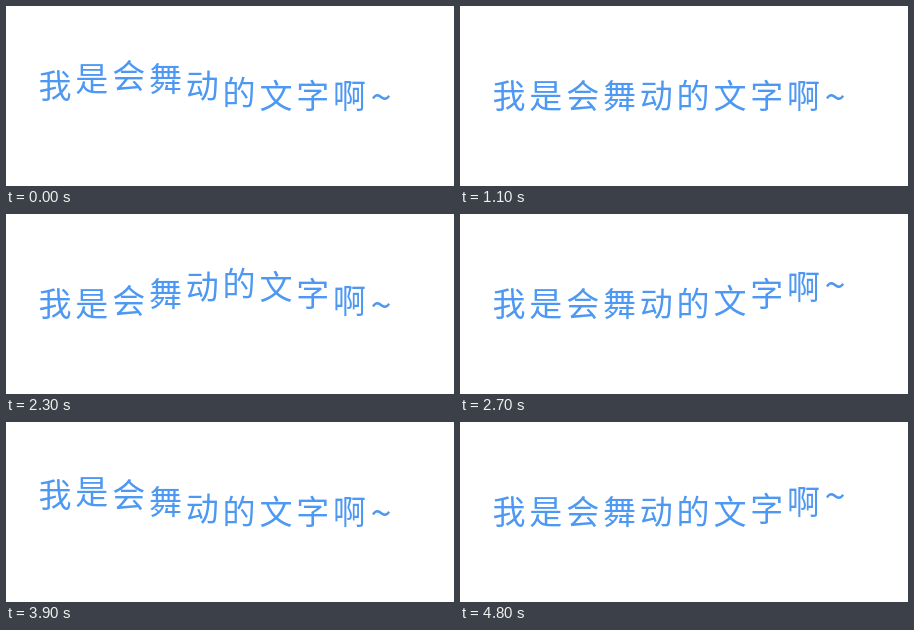
An HTML page for the animation above (4900 ms loop, 448 by 180 pixels).

```html
<!DOCTYPE html>
<html lang="zh-CN">
<head>
<meta charset="utf-8">
<title>舞动的文字</title>
<style>
  html, body {
    margin: 0;
    width: 100%;
    height: 100%;
    overflow: hidden;
    background: #fff;
  }
  .line {
    --t: 0;
    position: absolute;
    left: 32.5px;
    top: 62px;
    display: flex;
    align-items: flex-start;
    font: 400 33px/52px "Noto Sans CJK SC", "Noto Sans CJK", sans-serif;
    letter-spacing: 3.8px;
    white-space: nowrap;
    color: #4d98f2;
  }
  /* Each letter starts 100 ms after its neighbour; the clock sets --t. */
  .line span {
    animation: jump 2s ease-in-out infinite paused both;
    animation-delay: calc(var(--i) * 100ms - 600ms - var(--t) * 1ms);
  }
  .line span:last-child {
    position: relative;
    left: 0.8px;
    top: 1px;
    font-size: 38px;
  }
  @keyframes jump {
    0%, 40%, 100% { transform: translateY(0); }
    20% { transform: translateY(-20px); }
  }
</style>
</head>
<body>
<div class="line"></div>
<script>
  const LOOP = 4900, STEP = 100;
  const line = document.querySelector('.line');

  [...'我是会舞动的文字啊~'].forEach((char, i) => {
    const span = document.createElement('span');
    span.textContent = char;
    span.style.setProperty('--i', i);
    line.append(span);
  });

  // The loop cuts the third wave short, then jumps back to the start.
  function draw() {
    const time = performance.now() % LOOP;
    line.style.setProperty('--t', Math.floor(time / STEP) * STEP);
    requestAnimationFrame(draw);
  }
  draw();
</script>
</body>
</html>
```
